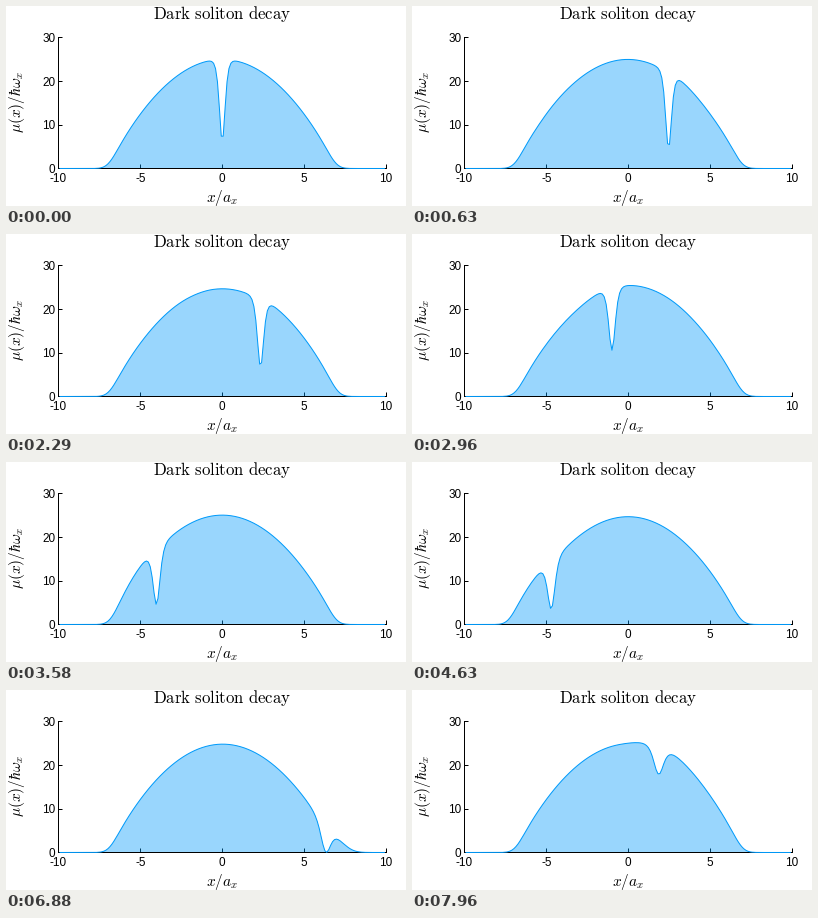
These frames come from a looping animation (400x200 px, 8000 ms). A matplotlib script:

```python
import numpy as np
import matplotlib.pyplot as plt
from matplotlib.animation import FuncAnimation

W, H, DPI = 400, 200, 100
LOOP, TICK = 8000, 20  # ms
FPS, STATES = 24, 192
BLUE = "#009AFA"

# Damped Gross-Pitaevskii equation in a harmonic trap
MU, GAMMA = 25.0, 0.01
L, N = 30.0, 256
DT = 6 * np.pi / np.sqrt(2) / 199
SPEED = 0.5  # soliton speed over sound speed

dx = L / N
x = (np.arange(N) - N / 2 + 0.5) * dx
k = 2 * np.pi * np.fft.fftfreq(N, dx)
trap = 0.5 * x**2


def evolve(psi, rate, dt, steps):
    """Strang splitting of psi_t = -rate (H - mu) psi."""
    drift = np.exp(-rate * dt * k**2 / 2)
    for _ in range(steps):
        psi = psi * np.exp(-rate * dt / 2 * (trap + np.abs(psi) ** 2 - MU))
        psi = np.fft.ifft(drift * np.fft.fft(psi))
        psi = psi * np.exp(-rate * dt / 2 * (trap + np.abs(psi) ** 2 - MU))
    return psi


def simulate():
    ground = np.sqrt(np.maximum(MU - trap, 0)).astype(complex)
    ground = evolve(ground, 1.0, 0.002, 4000)
    depth = np.sqrt(1 - SPEED**2)
    psi = ground * (depth * np.tanh(depth * np.sqrt(MU) * x) + 1j * SPEED)
    out = []
    for _ in range(STATES):
        out.append(np.abs(psi) ** 2)
        psi = evolve(psi, 1j + GAMMA, DT / 30, 30)
    return np.array(out)


plt.rcParams.update({
    "font.family": "Liberation Sans",
    "mathtext.fontset": "cm",
    "font.size": 8.5,
})

shown = np.abs(x) <= 10
xs = x[shown]
density = simulate()[:, shown]

# Plot area edges in pixels from the top left
LEFT, RIGHT, TOP, BOTTOM = 52.48, 380, 31.48, 162.48

fig = plt.figure(figsize=(W / DPI, H / DPI), dpi=DPI, facecolor="white")
ax = fig.add_axes([LEFT / W, 1 - BOTTOM / H,
                   (RIGHT - LEFT) / W, (BOTTOM - TOP) / H])
ax.set_xlim(-10, 10)
ax.set_ylim(0, 30)
for side in ("top", "right"):
    ax.spines[side].set_visible(False)
for side in ("left", "bottom"):
    ax.spines[side].set_linewidth(0.72)
xt, yt = range(-10, 11, 5), range(0, 31, 10)
ax.set_xticks(xt, [str(v) for v in xt])
ax.set_yticks(yt, [str(v) for v in yt])
ax.tick_params(direction="in", length=3, width=0.72)
ax.tick_params(axis="x", pad=3)
ax.tick_params(axis="y", pad=2.1)


def label(px, py, text, size, **kw):
    fig.text(px / W, 1 - py / H, text, fontsize=size, ha="center", **kw)


label(216.2, 13, r"$\mathrm{Dark\ soliton\ decay}$", 12.1, va="baseline")
label(216.2, 191.5, r"$x/a_x$", 11, va="center")
label(10.8, 96.2, r"$\mu(x)/\hbar\omega_x$", 11, va="center", rotation=90)

area, = ax.fill([0, 0], [0, 0], color=BLUE, alpha=0.4, lw=0, zorder=3)
curve, = ax.plot([], [], color=BLUE, lw=0.72, zorder=4, clip_on=False)


def update(i):
    # 24 states per second, shown on a clock of short ticks
    y = density[int((i * TICK + 15) * FPS / 1000)]
    curve.set_data(xs, y)
    area.set_xy(np.column_stack([np.r_[xs[0], xs, xs[-1]], np.r_[0, y, 0]]))
    return area, curve


anim = FuncAnimation(fig, update, frames=LOOP // TICK, interval=TICK,
                     repeat=True, repeat_delay=0, blit=False)
plt.show()
```
